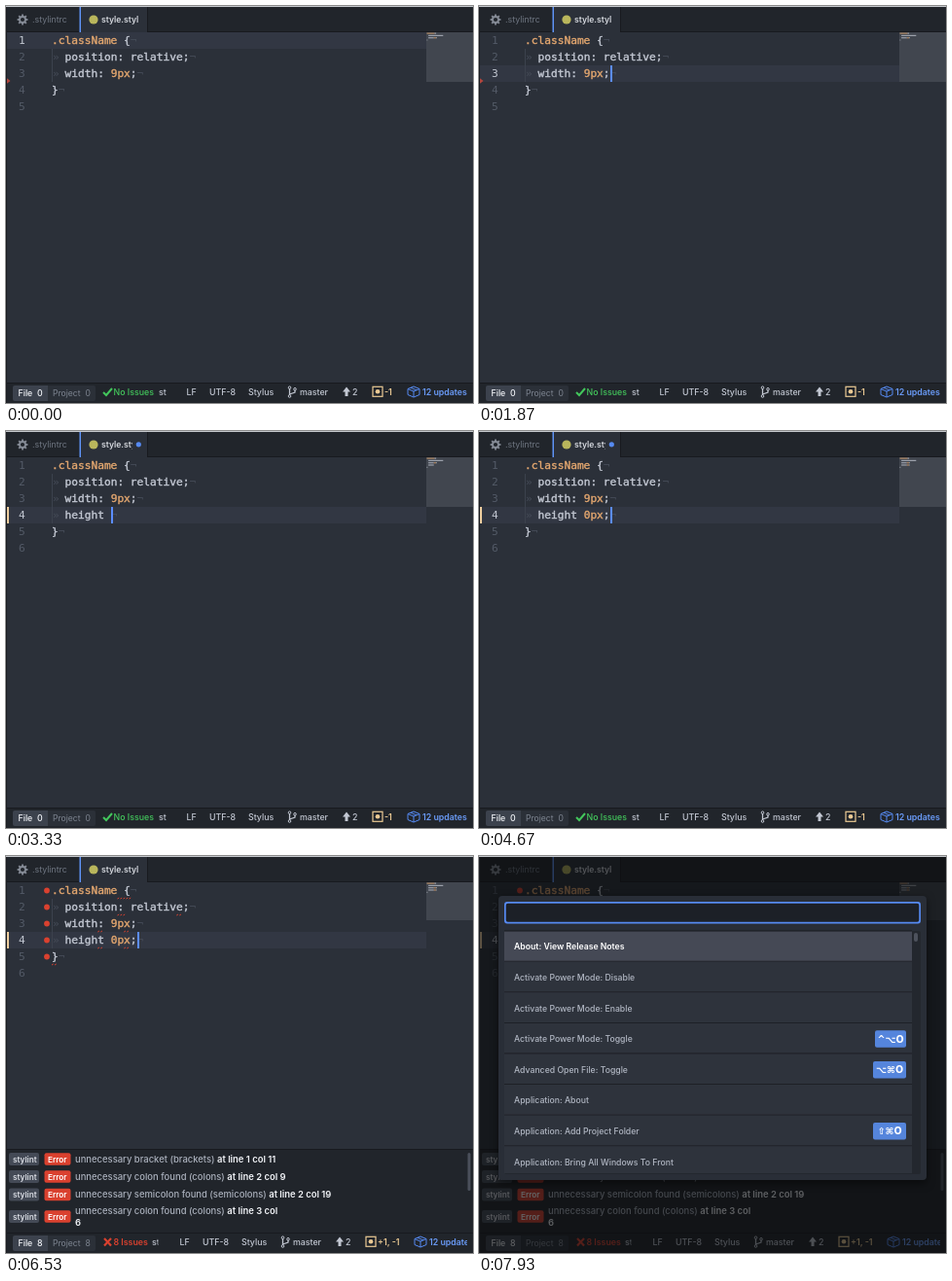
These frames come from a looping animation (480x408 px, 8 s). An HTML page with a canvas:

```html
<!DOCTYPE html>
<html lang="en">
<head>
<meta charset="utf-8">
<title>Editor linting</title>
<style>
html, body { margin: 0; width: 100%; height: 100%; overflow: hidden; background: #21252b; }
canvas { display: block; width: 480px; height: 408px; }
</style>
</head>
<body>
<canvas id="stage"></canvas>
<script>
const W = 480, H = 408, LOOP = 8000;
const canvas = document.getElementById('stage');
const ctx = canvas.getContext('2d');
const dpr = window.devicePixelRatio || 1;
canvas.width = W * dpr;
canvas.height = H * dpr;

const MONO = '"DejaVu Sans Mono", monospace';
const UI = 'Inter, "Open Sans", sans-serif';
const CODE = '11.2px ' + MONO;
const CODE_BOLD = 'bold 11.2px ' + MONO;
const STATUS = '500 8.8px ' + UI;
const STATUS_BOLD = '600 8.8px ' + UI;
const MESSAGE = '9.45px ' + UI;
const CHAR = 6.75, LEFT = 47, TOP = 27, ROW = 17, BASE = 38.6;

const C = {
  bar: '#21252b', editor: '#2b3039', active: '#323743', edge: '#181a1f',
  text: '#c2c7d2', dim: '#6f7682', faint: '#454b57', orange: '#e2a66f',
  blue: '#568af2', red: '#da412f', green: '#43c75c', yellow: '#ebca94', white: '#f2f4f8'
};

// Key presses: time and the typed text that results.
const KEYS = [
  [2200, 'h'], [2380, 'he'], [2530, 'hei'], [2640, 'heig'], [2760, 'heigh'],
  [2860, 'height'], [2960, 'height '], [3950, 'height 0'], [4200, 'height 0p'],
  [4330, 'height 0px'], [4560, 'height 0px;']
];
const MOVES = [[350, 1, 0], [1500, 2, 0], [1600, 3, 0], [1720, 3, 13]];
const ENTER = 1930, MODIFIED = 3270, SAVED = 5700, LINTED = 6000, PALETTE = 7600;

function rect(x, y, w, h, color, r = 0) {
  ctx.fillStyle = color;
  ctx.beginPath();
  ctx.roundRect(x, y, w, h, r);
  ctx.fill();
}

function circle(x, y, r, color) {
  ctx.fillStyle = color;
  ctx.beginPath();
  ctx.arc(x, y, r, 0, 7);
  ctx.fill();
}

function text(s, x, y, font, color) {
  ctx.font = font;
  ctx.fillStyle = color;
  ctx.fillText(s, x, y);
  return x + ctx.measureText(s).width;
}

// Code is set a little heavier than the regular weight.
function code(s, x, y, color) {
  const end = text(s, x, y, CODE, color);
  ctx.strokeStyle = color;
  ctx.lineWidth = 0.4;
  ctx.strokeText(s, x, y);
  return end;
}

function stroke(points, color, width = 1, closed = false) {
  ctx.strokeStyle = color;
  ctx.lineWidth = width;
  ctx.beginPath();
  points.forEach(([x, y], i) => i ? ctx.lineTo(x, y) : ctx.moveTo(x, y));
  if (closed) ctx.closePath();
  ctx.stroke();
}

function ring(x, y, r, color, width = 1) {
  ctx.strokeStyle = color;
  ctx.lineWidth = width;
  ctx.beginPath();
  ctx.arc(x, y, r, 0, 7);
  ctx.stroke();
}

function clip(x, y, w, h, draw) {
  ctx.save();
  ctx.beginPath();
  ctx.rect(x, y, w, h);
  ctx.clip();
  draw();
  ctx.restore();
}

function stateAt(t) {
  const s = {
    typed: '', line: 1, col: 0, last: 350,
    opened: t >= ENTER,
    modified: t >= MODIFIED && t < SAVED,
    changed: t >= MODIFIED,
    saved: t >= SAVED,
    linted: t >= LINTED
  };
  for (const [at, line, col] of MOVES) {
    if (t >= at) Object.assign(s, { last: at, line, col });
  }
  if (s.opened) Object.assign(s, { last: ENTER, line: 4, col: 2 });
  for (const [at, typed] of KEYS) {
    if (t >= at) Object.assign(s, { last: at, typed, col: 2 + typed.length });
  }
  s.cursor = t >= s.last && (t - s.last) % 800 < 400;
  return s;
}

function tabs(s) {
  rect(0, 0, W, TOP, C.bar);
  for (let i = 0; i < 8; i++) {
    const a = i * Math.PI / 4, x = Math.cos(a), y = Math.sin(a);
    stroke([[17 + x * 3, 14 + y * 3], [17 + x * 5.4, 14 + y * 5.4]], '#868c97', 1.8);
  }
  ring(17, 14, 3, '#868c97', 1.8);
  text('.stylintrc', 27, 17.2, '8.8px ' + UI, C.dim);
  rect(0, 26, W, 1, C.edge);
  rect(76, 0, 70, TOP, C.editor);
  rect(145, 0, 1, TOP, C.edge);
  rect(75.5, 0, 1.5, TOP, '#5f94f6');
  circle(90, 14, 4.6, '#b9b65c');
  clip(97, 0, s.modified ? 33 : 48, TOP, () => {
    text('style.styl', 98, 17.2, '600 8.6px ' + UI, '#d7dae0');
  });
  if (s.modified) circle(136.3, 13.8, 2.6, C.blue);
}

function codeLines(s) {
  const lines = [
    [0, [['.className', C.orange], [' {', C.text]]],
    [2, [['position: relative;', C.text]]],
    [2, [['width: ', C.text], ['9px', C.orange], [';', C.text]]]
  ];
  if (s.opened) {
    const [, word, value, end] = /^([a-z]* ?)([^;]*)(;?)$/.exec(s.typed);
    lines.push([2, [[word, C.text], [value, C.orange], [end, C.text]]]);
  }
  lines.push([0, [['}', C.text]]]);
  return lines;
}

function squiggle(col, line, count = 1) {
  const y = TOP + line * ROW;
  for (let x = 0; x < CHAR * count - 1; x += 3) {
    stroke([[LEFT + col * CHAR + x, y], [LEFT + col * CHAR + x + 1.7, y - 1]], C.red, 1);
  }
}

function editor(s) {
  rect(0, TOP, W, 361, C.editor);
  rect(0, TOP + (s.line - 1) * ROW, 432, ROW, C.active);
  const lines = codeLines(s);
  for (let i = 0; i <= lines.length; i++) {
    const color = i + 1 === s.line ? '#c3c8d2' : '#535a67';
    text(String(i + 1), 13, BASE + i * ROW, CODE, color);
  }
  lines.forEach(([indent, parts], i) => {
    const y = BASE + i * ROW;
    if (indent) {
      rect(LEFT, TOP + i * ROW, 1, ROW, '#3c424d');
      text('»', LEFT + 1, y, CODE, C.faint);
    }
    let x = LEFT + indent * CHAR;
    for (const [part, color] of parts) x = code(part, x, y, color);
    text('¬', x, y, CODE, C.faint);
  });

  if (s.changed) {
    rect(1, TOP + 3 * ROW, 2, ROW, '#efcfa0');
  } else {
    ctx.fillStyle = '#b5463d';
    ctx.beginPath();
    ctx.moveTo(0, 73.5);
    ctx.lineTo(4.5, 77);
    ctx.lineTo(0, 80.5);
    ctx.fill();
  }
  if (s.linted) {
    for (let i = 0; i < 5; i++) circle(42, TOP + (i + 0.5) * ROW, 2.9, C.red);
    squiggle(10, 1, 2);
    squiggle(10, 2, 1.4);
    squiggle(19, 2);
    squiggle(7, 3);
    squiggle(11, 3);
    squiggle(7, 4);
    squiggle(11, 4);
    squiggle(0, 5);
  }
  if (s.cursor) {
    rect(Math.round(LEFT + s.col * CHAR), TOP + (s.line - 1) * ROW, 2, ROW, '#5b8dff');
  }
  minimap(lines, s.linted ? 274 : 361);
}

function minimap(lines, height) {
  rect(432, TOP, 48, Math.round(height * 0.142), '#41464f');
  ctx.globalAlpha = 0.7;
  lines.forEach(([indent, parts], i) => {
    let x = 432.5 + indent * 0.8;
    for (const [part, color] of parts) {
      const w = part.length * 0.8;
      rect(x, 27.5 + i * 2.3, w, 1.2, color);
      x += w;
    }
  });
  ctx.globalAlpha = 1;
}

function suggestions(t) {
  if (t < 2330 || t >= 2960) return;
  const match = t < 2480 ? 'h' : t < 2600 ? 'he' : stateAt(t - 60).typed;
  const words = t < 2480 ? ['hack', 'height', 'hyphens'] : t < 2600 ? ['height', 'hyphens'] : ['height'];
  const step = 22.5, h = words.length * step + 1;
  ctx.save();
  ctx.shadowColor = 'rgba(0,0,0,.45)';
  ctx.shadowBlur = 7;
  ctx.shadowOffsetY = 2;
  rect(30, 94, 363, h, '#23272f', 3);
  ctx.restore();
  words.forEach((word, i) => {
    const y = 94.5 + i * step;
    if (!i) rect(30, y, 363, step, '#444956', [3, 3, 0, 0]);
    rect(30, y, 23, step, word === 'hack' ? '#40584b' : '#3a3f4b');
    if (word === 'hack') {
      stroke([[36, y + 11], [43, y + 11]], '#e2685f', 1.8);
      stroke([[40.5, y + 8], [43.8, y + 11], [40.5, y + 14]], '#e2685f', 1.6);
      stroke([[46.2, y + 7], [46.2, y + 15]], '#8fc98a', 1.8);
      code('hack', 272, y + 14.5, '#a3a9b5');
    } else {
      text('p', 38.2, y + 14.5, CODE_BOLD, '#a7adb9');
    }
    let x = 61;
    for (let n = 0; n < word.length; n++) {
      const hit = word === 'hyphens' && match === 'he' ? n === 0 || n === 4 : n < match.length;
      x = hit ? text(word[n], x, y + 14.5, CODE_BOLD, '#fff') : code(word[n], x, y + 14.5, C.text);
    }
  });
}

function lintPanel() {
  rect(0, 301, W, 87, C.bar);
  rect(0, 301, W, 1, C.edge);
  const rows = [
    ['unnecessary bracket (brackets)', 'at line 1 col 11', 311.5],
    ['unnecessary colon found (colons)', 'at line 2 col 9', 329.5],
    ['unnecessary semicolon found (semicolons)', 'at line 2 col 19', 348],
    ['unnecessary colon found (colons)', 'at line 3 col', 364.5, 370.5]
  ];
  const bold = '600 ' + MESSAGE;
  for (const [message, place, y, badge = y] of rows) {
    rect(3, badge - 6.5, 31, 13, '#444a56', 2);
    text('stylint', 7, badge + 3, '600 8.2px ' + UI, '#d9dce3');
    rect(39.5, badge - 6.2, 27, 12.4, C.red, 2);
    text('Error', 43, badge + 3, '600 8.2px ' + UI, '#fff');
    const x = text(message + ' ', 71, y + 3.2, '500 ' + MESSAGE, '#aab0bc');
    text(place, x, y + 3.2, bold, C.white);
  }
  text('6', 71, 379.5, bold, C.white);
  rect(474.5, 305, 3, 39, '#4b505b', 1.5);
}

function branchIcon(x) {
  stroke([[x, 393], [x, 400]], C.text, 1.3);
  stroke([[x + 5.5, 395], [x + 5.5, 397], [x, 399]], C.text, 1.2);
  ring(x, 392.2, 1.3, C.text);
  ring(x, 401, 1.3, C.text);
  ring(x + 5.5, 393.8, 1.3, C.text);
}

function cubeIcon(x) {
  const top = [[x, 393.5], [x + 6, 391], [x + 12, 393.5], [x + 6, 396]];
  stroke(top, C.blue, 1, true);
  stroke([[x, 393.5], [x, 399.5], [x + 6, 402], [x + 12, 399.5], [x + 12, 393.5]], C.blue, 1);
  stroke([[x + 6, 396], [x + 6, 402]], C.blue, 1);
  stroke([[x + 3, 392.3], [x + 9, 394.8]], C.blue, 1);
}

function statusBar(s) {
  rect(0, 387, W, 21, C.bar);
  rect(0, 387, W, 1, C.edge);
  const count = s.linted ? 8 : 0;
  rect(7, 390, 36, 16, '#3c424d', [2, 0, 0, 2]);
  rect(43, 390, 49, 16, '#2b3038', [0, 2, 2, 0]);
  text('File  ' + count, 12.5, 401.3, STATUS, C.white);
  text('Project  ' + count, 48, 401.3, '8.6px ' + UI, '#7d8490');

  const shift = s.linted ? -7 : 0;
  const label = (str, x, color = C.text, font = STATUS) => text(str, x + shift, 400.3, font, color);
  if (s.linted) {
    stroke([[101, 393], [108, 400.5]], C.red, 2.2);
    stroke([[108, 393], [101, 400.5]], C.red, 2.2);
    text('8 Issues', 110.5, 400.3, STATUS_BOLD, C.red);
  } else {
    stroke([[100, 397], [103, 400], [109, 393]], C.green, 2);
    text('No Issues', 110.5, 400.3, STATUS, C.green);
  }
  clip(150, 388, s.linted ? 6.5 : 15, 20, () => label('st', 157));
  label('LF', 185.5);
  label('UTF-8', 209);
  label('Stylus', 249);
  branchIcon(291.5 + shift);
  label('master', 302);
  const ax = 350 + shift;
  ctx.fillStyle = C.text;
  ctx.beginPath();
  [[0, -5], [4, 0], [1.5, 0], [1.5, 4.5], [-1.5, 4.5], [-1.5, 0], [-4, 0]]
    .forEach(([x, y]) => ctx.lineTo(ax + x, 396.5 + y));
  ctx.fill();
  label('2', 356);
  const bx = 377 + shift;
  ctx.strokeStyle = C.yellow;
  ctx.lineWidth = 1.2;
  ctx.strokeRect(bx, 391.3, 10, 10);
  circle(bx + 5, 396.3, 2.3, C.yellow);
  label(s.saved ? '+1, -1' : '-1', 389, C.yellow, STATUS_BOLD);
  const px = s.linted ? 435 : 428;
  cubeIcon(px - 15);
  clip(px - 1, 388, 475 - px, 20, () => text('12 updates', px, 400.3, STATUS_BOLD, '#6a9bf8'));
}

function palette(t) {
  const fade = Math.min(1, (t - PALETTE) / 150);
  rect(0, 0, W, H, `rgba(10,11,14,${0.64 * fade})`);
  ctx.save();
  ctx.shadowColor = 'rgba(0,0,0,.5)';
  ctx.shadowBlur = 9;
  ctx.shadowOffsetY = 3;
  rect(20, 41, 440, 292, '#292e37', 4);
  ctx.restore();
  rect(26, 47, 428, 22.5, C.blue, 3);
  rect(27.7, 48.7, 424.6, 19.1, '#1c2027', 2);
  rect(26, 77, 428, 250, '#23272e', 2);

  const items = [
    ['About: View Release Notes'],
    ['Activate Power Mode: Disable'],
    ['Activate Power Mode: Enable'],
    ['Activate Power Mode: Toggle', '^⌥O'],
    ['Advanced Open File: Toggle', '⌥⌘O'],
    ['Application: About'],
    ['Application: Add Project Folder', '⇧⌘O'],
    ['Application: Bring All Windows To Front']
  ];
  clip(26, 77, 419, 249, () => items.forEach(([name, keys], i) => {
    const y = 77 + i * 31.6;
    rect(26, y, 419, 31.6, i ? '#2e333c' : '#454955');
    rect(26, y + 30.8, 419, 1, C.edge);
    text(name, 36, y + 19.3, (i ? '500' : '600') + ' 8.7px ' + UI, i ? '#b0b6c2' : '#fff');
    if (!keys) return;
    const x = keys[0] === '^' ? 407 : 405;
    rect(x, y + 7.5, 439 - x, 17.5, '#5585dc', 2);
    ctx.textAlign = 'center';
    text(keys, (x + 439) / 2, y + 19.8, 'bold 9.6px "DejaVu Sans", sans-serif', '#fff');
    ctx.textAlign = 'left';
  }));
  rect(26, 76.5, 419, 1, C.edge);
  rect(447, 79, 4, 9, '#4d525d', 2);
}

function windowEdge() {
  rect(0, 0, 1, H, '#1a1c21');
  rect(0, 0, W, 1, '#c5c8cc');
}

function draw() {
  const t = performance.now() % LOOP;
  const s = stateAt(t);
  ctx.setTransform(dpr, 0, 0, dpr, 0, 0);
  editor(s);
  tabs(s);
  suggestions(t);
  if (s.linted) lintPanel();
  statusBar(s);
  if (t >= PALETTE) palette(t);
  windowEdge();
  requestAnimationFrame(draw);
}
draw();
</script>
</body>
</html>
```
